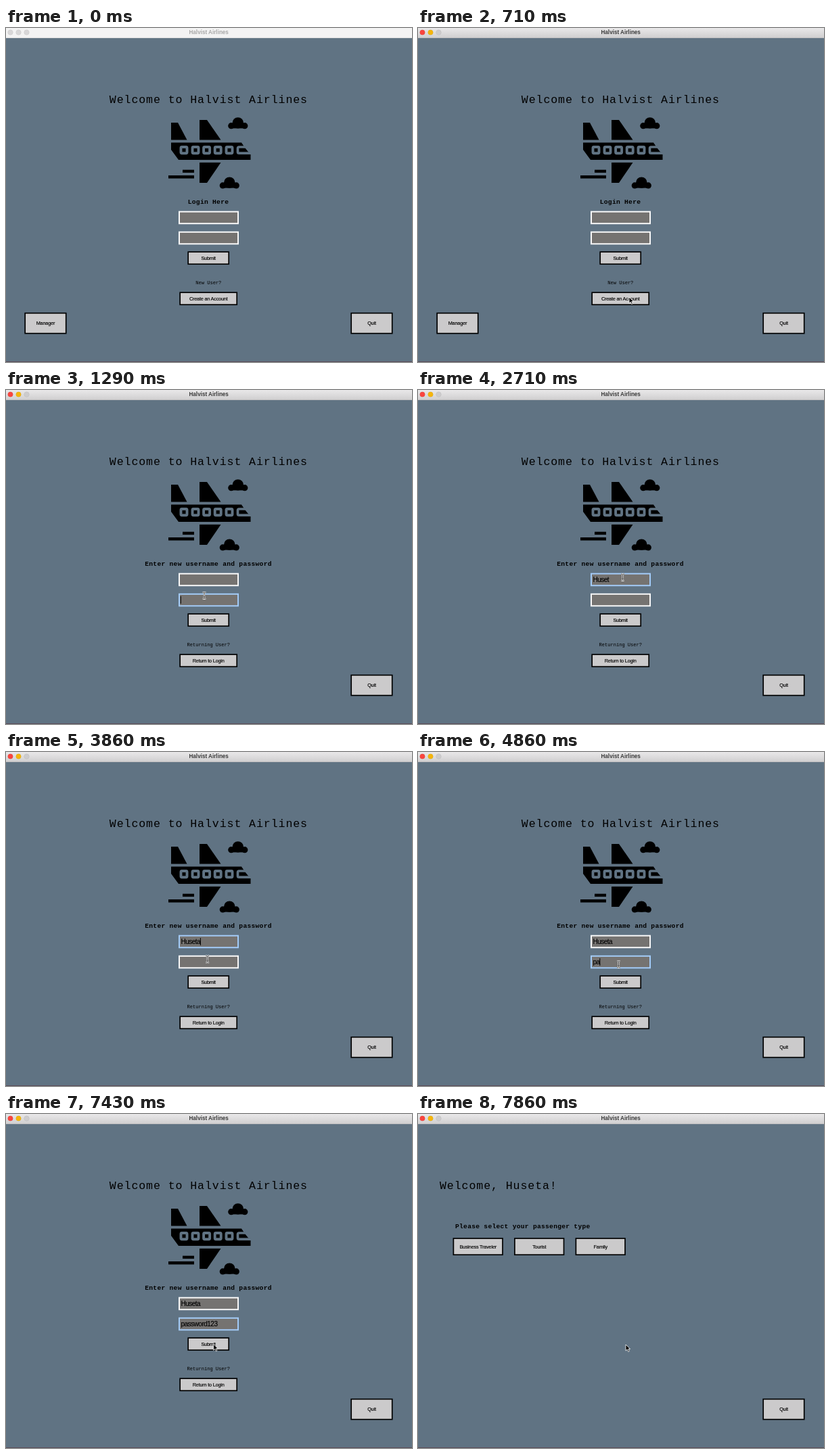
Recreate the animation shown at these times as an HTML page. Size 600 by 494 pixels, loop 8 s.

```html
<!DOCTYPE html>
<html lang="en">
<head>
<meta charset="utf-8">
<title>Airline login</title>
<style>
  html, body { margin: 0; width: 100%; height: 100%; overflow: hidden; background: #607383; }
  svg { display: block; width: 600px; height: 494px; }
  text { white-space: pre; }
  .mono { font-family: "Liberation Mono", monospace; }
  .big { font-size: 16.6px; letter-spacing: .9px; }
  .head { font-size: 9.6px; letter-spacing: .29px; font-weight: bold; }
  .note { font-size: 7.05px; }
  .sans { font-family: "Liberation Sans", Arial, sans-serif; }
  .label { font-size: 7.3px; letter-spacing: -.2px; stroke: #000; stroke-width: .15px; }
  .typed { font-size: 10px; letter-spacing: -.5px; stroke: #000; stroke-width: .15px; }
  .bar { font-size: 8.15px; font-weight: bold; }
  .mid { text-anchor: middle; }
</style>
</head>
<body>
<svg id="stage" viewBox="0 0 600 494"></svg>
<script>
const LOOP = 8000, TICK = 1000 / 7;
const BG = '#607383', BRAND = 'Halvist Airlines', USER = 'Huseta', PASS = 'password123';

const mono = (cls, x, y, s) => `<text class="mono ${cls}" x="${x}" y="${y}">${s}</text>`;
const poly = points => `<polygon points="${points}"/>`;
const group = (id, body) => `<g id="${id}">${body}</g>`;

const button = (x, y, w, h, s) =>
  `<rect x="${x}" y="${y}" width="${w}" height="${h}" fill="#cbcacb" stroke="#000" stroke-width="1.7"/>
   <text class="sans label mid" x="${x + w / 2}" y="${y + h / 2 + 2.5}">${s}</text>`;

const field = (id, y) => group(id,
  `<rect x="256" y="${y}" width="87" height="17.5" fill="#757371" stroke-width="2"/>
   <text class="sans typed" x="258.5" y="${y + 12.4}"></text>
   <path stroke="#000" stroke-width="1"/>`);

const cloud = (x, y) => `<g transform="translate(${x} ${y})">
  <circle r="8.2"/><circle cx="-10" cy="4.3" r="4.6"/><circle cx="10" cy="4.3" r="4.6"/>
  <rect x="-10" y="1" width="20" height="7"/></g>`;

const porthole = x =>
  `<rect x="${x - 4.5}" y="176" width="9" height="9.2" rx="1.4" fill="none" stroke="${BG}" stroke-width="3.9"/>`;

const plane = poly('244,140 254,140 267.5,165.5 244,165.5')
  + poly('286,136 297,136 317.5,165.5 286,165.5')
  + poly('244,169.5 348,169.5 353,177 357,182 361.5,187 361.5,195 255,195 244,180')
  + poly('286,199 317.5,199 297,229 286,229')
  + [263, 280, 296.6, 313.2, 330].map(porthole).join('')
  + `<path d="M354 176H344.5a2 2 0 0 0-2 2v5.2a2 2 0 0 0 2 2H362" fill="none" stroke="${BG}" stroke-width="3.7"/>`
  + '<rect x="261" y="209.7" width="17" height="4.3"/><rect x="240" y="218" width="38" height="4.5"/>'
  + cloud(342.8, 140.4) + cloud(330.3, 228.6);

const dots = fills => fills.map((f, i) =>
  `<circle cx="${6.5 + 12 * i}" cy="6.5" r="3.8" fill="${f}" stroke="#000" stroke-opacity=".1" stroke-width=".5"/>`).join('');

const titleBar = (id, fill, edge, ink, fills) => group(id,
  `<rect width="600" height="15" fill="${fill}"/>
   <rect y="14" width="600" height="1" fill="${edge}"/>${dots(fills)}
   <text class="sans bar mid" x="299.7" y="9.3" fill="${ink}">${BRAND}</text>`);

stage.innerHTML = `
  <defs><linearGradient id="chrome" x2="0" y2="1">
    <stop stop-color="#e9e8e9"/><stop offset="1" stop-color="#cfcecf"/>
  </linearGradient></defs>
  <rect width="600" height="494" fill="${BG}"/>
  <rect y="493" width="600" height="1" fill="#5a4d5a"/>`
  + titleBar('idle', '#f3f3f3', '#dedede', '#a8a8a8', Array(3).fill('#d8d7d8'))
  + titleBar('active', 'url(#chrome)', '#bfbebf', '#3a3a3a', ['#f9453f', '#f4b50c', '#cdcccd'])
  + group('art', plane + button(269.2, 331.2, 60, 18, 'Submit'))
  + group('form', mono('big mid', 299.4, 111, 'Welcome to ' + BRAND) + field('user', 271.7) + field('pass', 301.8))
  + group('loginText', mono('head mid', 299, 260, 'Login Here') + mono('note mid', 299.3, 379, 'New User?'))
  + group('loginKeys', button(257.2, 391.2, 84, 18, 'Create an Account') + button(28.2, 421.7, 60.5, 30, 'Manager'))
  + group('signupText', mono('head mid', 299, 260, 'Enter new username and password')
    + mono('note mid', 299.3, 379, 'Returning User?'))
  + group('signupKeys', button(257.2, 391.2, 84, 18, 'Return to Login'))
  + group('home', mono('big', 32, 111, `Welcome, ${USER}!`)
    + mono('head', 55, 169.3, 'Please select your passenger type')
    + ['Business Traveler', 'Tourist', 'Family'].map((s, i) => button(52.4 + 90.5 * i, 184, 72.6, 24.2, s)).join(''))
  + button(510.2, 421.7, 60.5, 30, 'Quit')
  + group('arrow', '<path d="M0 0V9.2L2.2 7.2 3.7 10.6 5.3 9.9 3.8 6.6H6.7Z" stroke="#fff" stroke-width=".8"/>')
  + group('beam', [['#eee', 2.2], ['#333', .8]].map(([ink, w]) =>
    `<path d="M-2.5-5Q0-5 0-3.2V3.2Q0 5-2.5 5M2.5-5Q0-5 0-3.2M0 3.2Q0 5 2.5 5M-1.5 1.8H1.5" fill="none" stroke="${ink}" stroke-width="${w}"/>`
  ).join(''));

const $ = id => document.getElementById(id);
const show = (id, on) => $(id).style.display = on ? '' : 'none';

// pointer path: tick, x, y
const path = [[1, 480, 250], [3, 370, 365], [5, 312, 398], [6, 311, 396], [7, 311, 373], [9, 293, 304],
  [13, 302.5, 277], [22, 302.5, 277], [25, 300, 291], [28, 296.5, 314], [48, 296.5, 314],
  [50, 302, 332], [52, 306.6, 340.3], [55, 307, 341]];
// tick at which each letter appears
const userKeys = [15, 16, 16, 18, 19, 20];
const passKeys = [34, 34, 35, 37, 38, 39, 40, 41, 42, 43, 44];
// start time and field of each focus
const focuses = [[1285, 'pass'], [2000, 'user'], [3950, 'pass']];

function pointAt(n) {
  const i = path.findIndex(p => p[0] >= n);
  if (i < 1) return path[0].slice(1);
  const [a, x0, y0] = path[i - 1], [b, x1, y1] = path[i], k = (n - a) / (b - a);
  return [x0 + (x1 - x0) * k, y0 + (y1 - y0) * k];
}

function drawField(id, top, text, focused, caret) {
  const [box, label, bar] = $(id).children;
  box.setAttribute('stroke', focused ? '#a3cbf7' : '#f8f8f8');
  label.textContent = text;
  const x = 258.3 + (text ? label.getComputedTextLength() + .4 : 0);
  bar.setAttribute('d', focused && caret ? `M${x} ${top + 3}v11` : '');
}

function render(time) {
  const n = Math.floor((time + 5) / TICK), t = n * TICK;
  const login = n < 7, signup = n >= 9 && n < 54, home = n >= 55;
  show('idle', n < 4);
  show('active', n >= 4);
  show('art', !home);
  show('form', login || signup);
  show('loginText', login);
  show('loginKeys', n < 9);
  show('signupText', signup);
  show('signupKeys', n >= 9 && !home);
  show('home', home);

  if (login || signup) {
    const [start, id] = focuses.filter(f => f[0] <= t).pop() || [0, ''];
    const caret = (t - start) % 900 < 600;
    const typed = (s, keys) => s.slice(0, keys.filter(k => k <= n).length);
    drawField('user', 272, typed(USER, userKeys), id === 'user', caret);
    drawField('pass', 302, typed(PASS, passKeys), id === 'pass', caret);
  }

  const [x, y] = pointAt(n);
  const over = signup && x > 255 && x < 344 && (y > 271 && y < 290 || y > 301 && y < 320);
  show('arrow', n > 0 && !over);
  show('beam', over);
  $(over ? 'beam' : 'arrow').setAttribute('transform', `translate(${x} ${y})`);
}

const begin = performance.now();
function loop() {
  render((performance.now() - begin) % LOOP);
  requestAnimationFrame(loop);
}
loop();
</script>
</body>
</html>
```
